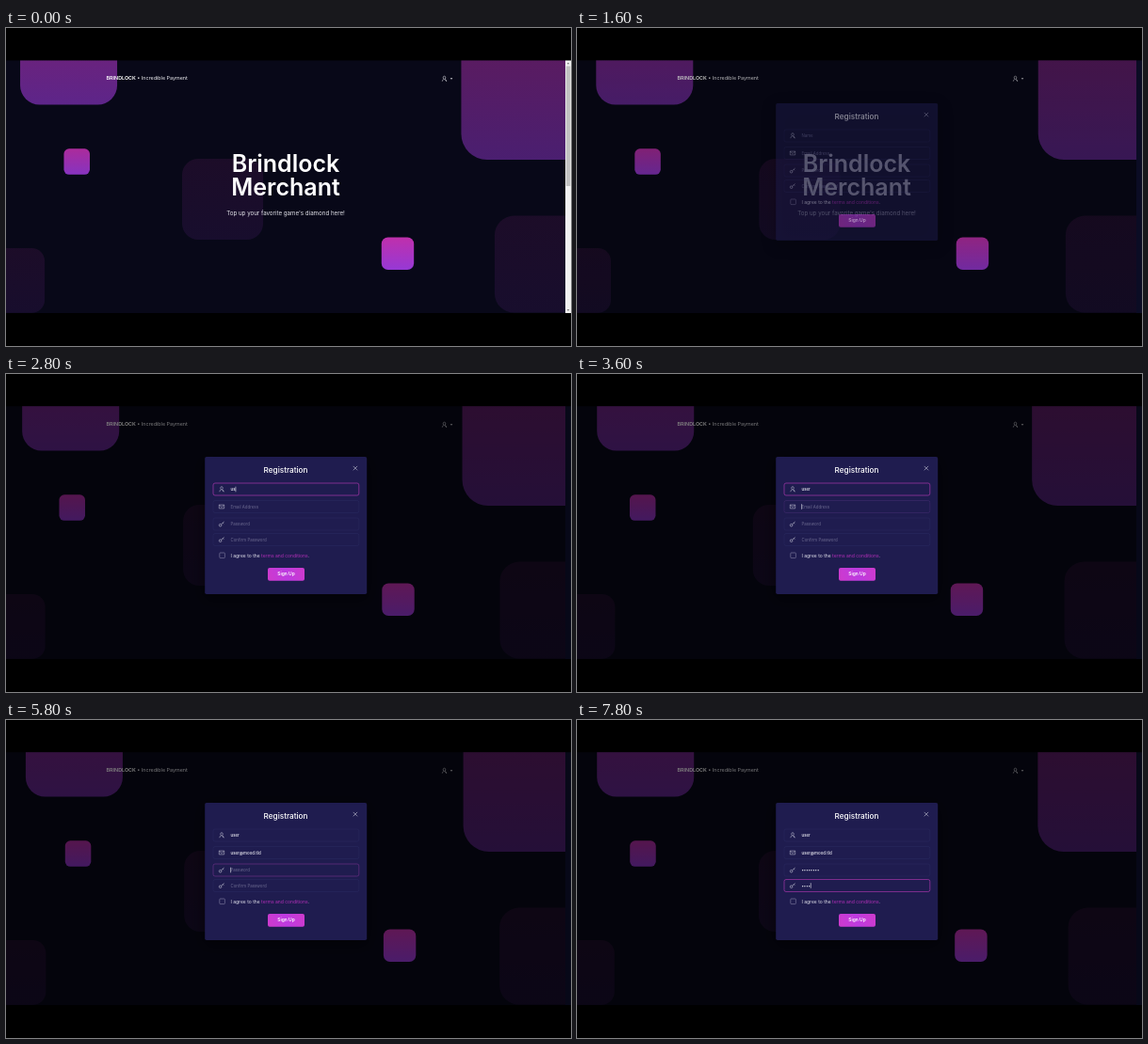
These frames come from a looping animation (600x338 px, 8000 ms). An HTML page with a canvas:

```html
<!DOCTYPE html>
<html lang="en">
<head>
<meta charset="utf-8">
<title>Registration</title>
<style>
  html, body { margin: 0; width: 100%; height: 100%; overflow: hidden; background: #000; }
  canvas { display: block; width: 600px; height: 338px; }
</style>
</head>
<body>
<canvas id="stage"></canvas>
<script>
const W = 600, H = 338, LOOP = 8000, STEP = 200;
const TOP = 34.5, BOTTOM = 303, PAGE_W = 594;
const canvas = document.getElementById('stage');
const ctx = canvas.getContext('2d');
const dpr = window.devicePixelRatio || 1;
canvas.width = W * dpr;
canvas.height = H * dpr;

const clamp = v => Math.max(0, Math.min(1, v));
const mix = (a, b, k) => a + (b - a) * k;

// CSS "ease": cubic-bezier(.25, .1, .25, 1)
function ease(x) {
  const curve = (a, b, s) => 3 * a * s * (1 - s) ** 2 + 3 * b * s * s * (1 - s) + s ** 3;
  let lo = 0, hi = 1;
  for (let i = 0; i < 24; i++) {
    const mid = (lo + hi) / 2;
    if (curve(.25, .25, mid) < x) lo = mid; else hi = mid;
  }
  return curve(.1, 1, lo);
}

// Squares sway sideways around x; beat is the relative period.
const SWAY = 3.43, BEAT = 1600 / 3, SWAY_LEAD = 6000;
const squares = [
  { x: 17.8,  y: -21.5, size: 103,   alpha: .54, beat: 4 },
  { x: 486.6, y: 2.7,   size: 137.3, alpha: .42, beat: 6 },
  { x: -29.7, y: 234,   size: 68.7,  alpha: .1,  beat: 5 },
  { x: 399.4, y: 222.5, size: 34.4,  alpha: .9,  beat: 10 },
  { x: 190.2, y: 139,   size: 86,    alpha: .1,  beat: 6 },
  { x: 59.4,  y: 128.3, size: 27.5,  alpha: .8,  beat: 9 },
  { x: 521,   y: 199.6, size: 103,   alpha: .1,  beat: 3 }
];

const MENU_OPEN = 800, MODAL_OPEN = 1500;
const fields = [
  { label: 'Name',             y: 122.5, icon: user, value: 'user',          focus: 2050, type: [2400, 3200] },
  { label: 'Email Address',    y: 141,   icon: mail, value: 'user@mood.tld', focus: 3550, type: [3600, 5520] },
  { label: 'Password',         y: 159.5, icon: key,  value: '••••••••',      focus: 5650, type: [5800, 6900] },
  { label: 'Confirm Password', y: 176,   icon: key,  value: '••••',          focus: 7050, type: [7100, 7750] }
];

function box(x, y, w, h, r) {
  ctx.beginPath();
  ctx.roundRect(x, y, w, h, r);
}

function vertical(y0, y1, from, to) {
  const g = ctx.createLinearGradient(0, y0, 0, y1);
  g.addColorStop(0, from);
  g.addColorStop(1, to);
  return g;
}

// Draws text with its middle at y and returns the x where it ends.
function text(str, x, y, size, color, weight = 400, align = 'left') {
  ctx.font = `${weight} ${size}px Inter, "Open Sans", sans-serif`;
  ctx.textAlign = align;
  ctx.textBaseline = 'alphabetic';
  ctx.fillStyle = color;
  ctx.fillText(str, x, y + size * .36);
  return x + ctx.measureText(str).width;
}

function lines(color, width, ...paths) {
  ctx.strokeStyle = color;
  ctx.lineWidth = width;
  ctx.beginPath();
  for (const p of paths) {
    ctx.moveTo(p[0], p[1]);
    for (let i = 2; i < p.length; i += 2) ctx.lineTo(p[i], p[i + 1]);
  }
  ctx.stroke();
}

function triangle(x, y, w, h, color) {
  ctx.fillStyle = color;
  ctx.beginPath();
  ctx.moveTo(x - w / 2, y - h / 2);
  ctx.lineTo(x + w / 2, y - h / 2);
  ctx.lineTo(x, y + h / 2);
  ctx.fill();
}

function user(x, y, color) {
  ctx.strokeStyle = color;
  ctx.lineWidth = .6;
  ctx.beginPath();
  ctx.ellipse(x, y - 1.2, 1.3, 1.6, 0, 0, 7);
  ctx.moveTo(x - 2.2, y + 2.7);
  ctx.quadraticCurveTo(x - 2.2, y + 1, x - .7, y + .6);
  ctx.moveTo(x + .7, y + .6);
  ctx.quadraticCurveTo(x + 2.2, y + 1, x + 2.2, y + 2.7);
  ctx.closePath();
  ctx.stroke();
}

function mail(x, y, color) {
  lines(color, .6,
    [x - 2.7, y - 1.9, x + 2.7, y - 1.9, x + 2.7, y + 1.9, x - 2.7, y + 1.9, x - 2.7, y - 2.1],
    [x - 2.6, y - 1.7, x, y + .5, x + 2.6, y - 1.7]);
}

function key(x, y, color) {
  lines(color, .7, [x - .4, y + .2, x + 2.6, y - 2.4], [x + 1.3, y - 1.2, x + 2.2, y - .3]);
  ctx.beginPath();
  ctx.arc(x - 1.4, y + 1.2, 1.3, 0, 7);
  ctx.stroke();
}

function drawSquare(s, t) {
  const phase = ((t + SWAY_LEAD) / (s.beat * BEAT)) % 1;
  const k = phase < .5 ? ease(phase * 2) : 1 - ease(phase * 2 - 1);
  ctx.globalAlpha = s.alpha;
  ctx.fillStyle = vertical(s.y, s.y + s.size, '#d434bc', '#a63eea');
  box(s.x + mix(-SWAY, SWAY, k), s.y, s.size, s.size, s.size * .2);
  ctx.fill();
  ctx.globalAlpha = 1;
}

function drawPage(t) {
  ctx.fillStyle = '#080818';
  ctx.fillRect(0, TOP, PAGE_W, BOTTOM - TOP);
  ctx.save();
  ctx.beginPath();
  ctx.rect(0, TOP, PAGE_W, BOTTOM - TOP);
  ctx.clip();
  for (const s of squares) drawSquare(s, t);
  ctx.restore();

  const x = text('BRINDLOCK', 106.5, 53.5, 5.4, '#fff', 600);
  text(' • Incredible Payment', x, 53.5, 5.4, '#f0f0f4');
  user(465.5, 54, '#d8d8e0');
  triangle(473, 54, 2.6, 1.5, '#e4e4ea');

  text('Brindlock', 297, 144, 25, '#fff', 600, 'center');
  text('Merchant', 297, 169, 25, '#fff', 600, 'center');
  text("Top up your favorite game's diamond here!", 297, 196.5, 6.2, '#e6e6ec', 400, 'center');
}

function drawScrollbar() {
  ctx.fillStyle = '#f1f1f1';
  ctx.fillRect(PAGE_W, TOP, W - PAGE_W, BOTTOM - TOP);
  ctx.fillStyle = '#c1c1c1';
  ctx.fillRect(594.8, 40.5, 4.5, 127.5);
  triangle(597, 37.5, 2.6, -1.6, '#555');
  triangle(597, 300, 2.6, 1.6, '#555');
}

function drawMenu() {
  ctx.save();
  ctx.shadowColor = 'rgba(0,0,0,.4)';
  ctx.shadowBlur = 6 * dpr;
  ctx.fillStyle = '#fff';
  box(455, 62, 55, 34.7, .8);
  ctx.fill();
  ctx.restore();
  triangle(460.5, 61, 4, -2.5, '#fff');
  user(466, 72.5, '#c4c4cc');
  text('Sign in', 474, 72.5, 4.4, '#8e8e98');
  key(466, 87.5, '#c4c4cc');
  text('Register', 474, 87.5, 4.4, '#8e8e98');
}

function drawHand(t) {
  const k = clamp((t - 1000) / 400);
  ctx.save();
  ctx.translate(mix(474, 482, k), mix(53, 86, k));
  ctx.fillStyle = '#fff';
  ctx.strokeStyle = '#111';
  ctx.lineWidth = .5;
  ctx.beginPath();
  ctx.roundRect(-.9, -1, 1.5, 5, .7);
  ctx.roundRect(-1.2, 2, 4.2, 4.6, 1.2);
  ctx.moveTo(-1, 4.4);
  ctx.lineTo(-2.2, 2.8);
  ctx.lineTo(-2.4, 3.8);
  ctx.lineTo(-.6, 6.2);
  ctx.stroke();
  ctx.fill();
  ctx.restore();
}

function drawField(f, i, t) {
  const next = fields[i + 1] ? fields[i + 1].focus : Infinity;
  const glow = t < next + 100 ? clamp((t - f.focus) / 300) : 0;
  const top = f.y - 6.5;
  ctx.lineWidth = .7;
  ctx.strokeStyle = 'rgba(52,56,112,.4)';
  box(220, top, 154.8, 13, 2);
  ctx.stroke();
  if (glow) {
    ctx.strokeStyle = `rgba(178,52,172,${.9 * glow})`;
    ctx.stroke();
  }
  f.icon(229, f.y, '#b4b4c8');

  const [start, end] = f.type;
  const count = Math.floor(f.value.length * clamp((t - start) / (end - start)) + .01);
  let caret = 238.6;
  if (count) caret = text(f.value.slice(0, count), 238.5, f.y, 4.4, '#f0f0f6', 500) + .4;
  else text(f.label, 238.5, f.y, 4.4, '#6c6a90');
  if (t >= f.focus && t < next) lines('#e8e8f0', .6, [caret, f.y - 2.8, caret, f.y + 2.8]);
}

function drawModal(t) {
  ctx.save();
  ctx.shadowColor = 'rgba(0,0,0,.5)';
  ctx.shadowBlur = 16 * dpr;
  ctx.shadowOffsetY = 4 * dpr;
  ctx.fillStyle = '#1f1c4f';
  box(211.2, 88, 172, 146, 1.8);
  ctx.fill();
  ctx.restore();

  text('Registration', 297, 102, 8.2, '#fff', 500, 'center');
  lines('#b0b0c4', .7, [368.7, 97.9, 373.1, 102.3], [373.1, 97.9, 368.7, 102.3]);
  fields.forEach((f, i) => drawField(f, i, t));

  ctx.strokeStyle = '#8684a6';
  ctx.lineWidth = .6;
  box(226.8, 190, 5.6, 5.6, .8);
  ctx.stroke();
  let x = text('I agree to the ', 238.5, 193, 5, '#e4e4ee');
  x = text('terms and conditions', x, 193, 5, '#b32fb8');
  text('.', x, 193, 5, '#e4e4ee');

  const g = ctx.createLinearGradient(317, 206, 278, 219.5);
  g.addColorStop(0, '#cf3acc');
  g.addColorStop(.5, '#bd3be0');
  g.addColorStop(1, '#cf3acc');
  ctx.fillStyle = g;
  box(278, 206, 39, 13.7, 2);
  ctx.fill();
  text('Sign Up', 297.5, 212.7, 4.9, '#fff', 600, 'center');
}

function draw(t) {
  ctx.setTransform(dpr, 0, 0, dpr, 0, 0);
  ctx.fillStyle = '#000';
  ctx.fillRect(0, 0, W, H);
  drawPage(t);

  const shown = clamp((t - MODAL_OPEN) / 200);
  if (!shown) {
    drawScrollbar();
    if (t >= MENU_OPEN) drawMenu();
    if (t >= 600) drawHand(t);
    return;
  }
  ctx.fillStyle = '#0f1030';
  ctx.fillRect(PAGE_W, TOP, W - PAGE_W, BOTTOM - TOP);
  ctx.fillStyle = `rgba(0,0,0,${.5 * shown})`;
  ctx.fillRect(0, TOP, W, BOTTOM - TOP);
  ctx.globalAlpha = shown;
  ctx.translate(0, -16 * (1 - shown));
  drawModal(t);
  ctx.globalAlpha = 1;
}

const begin = performance.now();
function tick() {
  const t = (performance.now() - begin) % LOOP;
  draw(Math.floor(t / STEP) * STEP);
  requestAnimationFrame(tick);
}
tick();
</script>
</body>
</html>
```
